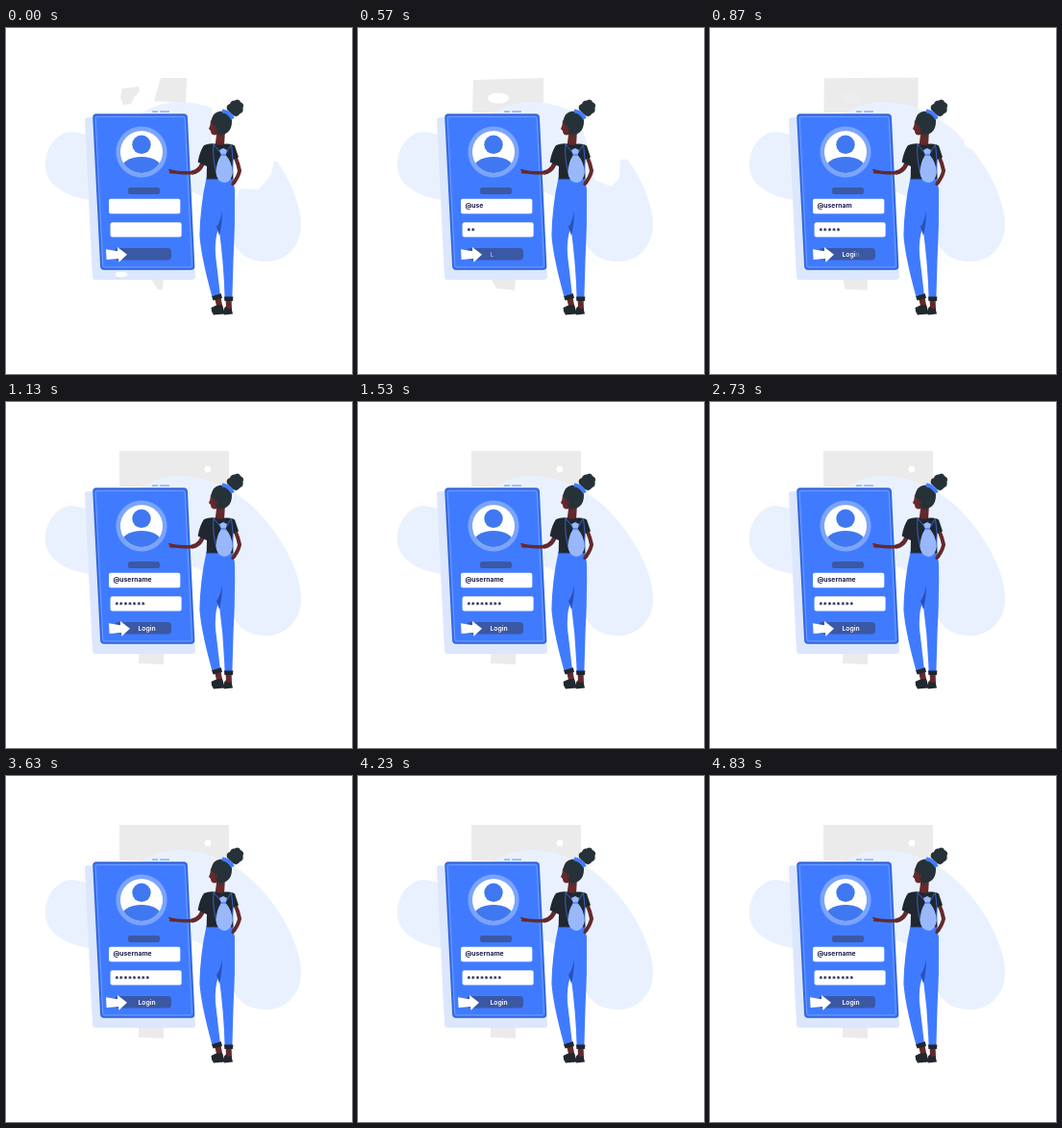
An HTML page that plays this animation: 360 by 360 pixels, repeating every 5.13 s.

```html
<!DOCTYPE html>
<html lang="en">
<head>
<meta charset="utf-8">
<title>Login</title>
<style>
  html, body { margin: 0; width: 100%; height: 100%; overflow: hidden; background: #fff; }
  svg { display: block; width: 100vw; height: 100vh; }
  text { font-family: Inter, "Open Sans", sans-serif; font-weight: 600; font-size: 6.8px; }
  .blue { fill: #407bff; }
  .dark { fill: #20272e; }
  .hair { fill: #263238; }
  .skin { fill: #64292b; }
  .limb { fill: none; stroke: #64292b; stroke-linecap: round; stroke-linejoin: round; }
  .ink { fill: #1b1a4b; font-weight: 700; }
  .bar { fill: #3a58a4; }
</style>
</head>
<body>
<svg viewBox="0 0 360 360" xmlns="http://www.w3.org/2000/svg">
  <rect width="360" height="360" fill="#fff"/>

  <g fill="#ebebeb">
    <path id="scrap" d="M121 63L138 61L139 66L134 71L130 79L122 80L119 72Z"/>
    <path id="screen"/>
    <path id="stub"/>
  </g>
  <ellipse id="hole" cx="146" cy="73" rx="11" ry="5.5" fill="#fff"/>
  <circle id="lens" cx="210" cy="70" r="3.4" fill="#fff"/>

  <path fill="#eaf1fe" d="M41 138C43 121 56 107 69 108C83 109 92 116 108 112C130 104 138 80 176 77
    C203 76 231 87 251 104C276 125 302 162 307 199C309 227 291 244 269 243
    C251 242 244 236 237 225C226 205 218 178 194 171C164 164 112 184 87 179C60 175 38 161 41 138Z"/>
  <polygon id="cover" fill="#fff"/>

  <!-- card -->
  <path fill="#dce7fe" d="M85 93H186Q189 93 189 96L197 259Q197 262 194 262H93Q90 262 90 259L82 96Q82 93 85 93Z"/>
  <ellipse id="gap" cx="120" cy="256.5" rx="6.5" ry="2.8" fill="#fff"/>
  <path d="M152 87H158M160 87H170" stroke="#5c8df5" stroke-width="1.2"/>
  <path class="blue" stroke="#2f63d2" stroke-width="1.4"
    d="M94 90H185Q188 90 188.2 93L195.6 248Q195.6 251 192.6 251H102Q99 251 98.8 248L91 93Q91 90 94 90Z"/>
  <path fill="none" stroke="#7fa7fb" stroke-width=".7"
    d="M95 92.5H184Q186 92.5 186.2 95L193.4 246.5Q193.4 248.8 191 248.8H103Q101 248.8 100.8 246.5L93.3 95Q93.3 92.5 95 92.5Z"/>

  <circle cx="141" cy="129" r="26.6" fill="#7ba4fc"/>
  <circle cx="141" cy="129" r="22" fill="#fff"/>
  <clipPath id="disc"><circle cx="141" cy="129" r="22"/></clipPath>
  <g fill="#3f78f0" clip-path="url(#disc)">
    <circle cx="141" cy="121.3" r="9.7"/>
    <ellipse cx="141" cy="148" rx="22" ry="14"/>
  </g>

  <rect class="bar" x="127" y="166" width="33" height="7" rx="2.5"/>
  <g fill="#fff">
    <rect x="107" y="177.7" width="74.3" height="15.5" rx="2"/>
    <rect x="108.6" y="202.3" width="74" height="15.1" rx="2"/>
  </g>
  <rect class="bar" x="113" y="229" width="59" height="12.4" rx="4"/>
  <text id="user" class="ink" x="111.4" y="187.2"></text>
  <text id="pass" class="ink" x="113" y="214.2" style="font-size:8.2px"></text>
  <text id="login" x="137.5" y="237.6" fill="#fff"></text>
  <path id="arrow" fill="#fff" d="M104 230.3L116 232.2V228L126 235.8L117.4 243.8L117 240L104.6 241Z"/>

  <!-- woman -->
  <path class="hair" d="M230 85Q228.5 80 233 79Q234 75 238 75.5Q242 73 244 77Q248.5 79 246.5 83Q247.5 88 243.5 89Q241 93.5 236.5 91Z"/>
  <path class="skin" d="M215 93Q212 97 212.5 101L211 105L213 107Q213 111 217 111.5L219 111L217.5 123H227L228 105Z"/>
  <path class="hair" d="M214 97Q214 88 223 86.5Q234 87 235 96Q235.5 105 230 109Q225 113 220 110Q217 105 217.5 101Q214 101 214 97Z"/>
  <path d="M225 86.3Q232.5 87.6 236 94.5" fill="none" stroke="#407bff" stroke-width="4"/>
  <circle cx="218.7" cy="104.4" r="1.3" class="skin"/>

  <path class="limb" stroke-width="4.4" d="M206 136Q203.5 148.5 194 150.4"/>
  <path class="limb" stroke-width="3.5" d="M195 150.2Q184 151.8 172.5 149.4"/>
  <path class="limb" stroke-width="1.8" d="M175 149.8L170 147.7M175 150.6L170.6 150.3"/>
  <path class="limb" stroke-width="4" d="M238.5 134Q241.5 141 243 148.5Q242 154 237 161"/>

  <path class="blue" d="M208.5 156H236L238 168Q238.6 205 236.6 240L235.4 281H227.6Q226.6 245 221.5 208Q217 218 218 236L222.8 277L214.2 279Q203 238 201.4 216Q202 185 208.5 156Z"/>
  <path fill="#2753b8" d="M225 190Q223 202 219 207L222 216Q225 204 225 190Z"/>
  <path class="dark" d="M206 122Q212 119.5 217.5 120.5Q223 123 228 120.5Q235 120 238 122.5L242 134.5L236 137L236.5 157H208.7L209 144L199.6 139.5Q201.6 128 206 122Z"/>
  <path d="M208.6 157.4H236.5" stroke="#2b5dcc" stroke-width="1"/>

  <path d="M216 121L225 132M234.5 121L228 132M216 121Q214.5 139 220 154M234.5 121Q237.5 138 235 153" fill="none" stroke="#3565c4" stroke-width="1"/>
  <path fill="#98b8fb" d="M222 127L226 125L230 127L228.5 132Q235 139 235.8 150Q235 160 227.5 161Q219 160 218.4 150Q219 139 224 132Z"/>
  <path d="M223.2 132H229" stroke="#407bff" stroke-width="1.3"/>
  <path class="limb" stroke-width="3" d="M237 160L235.8 162.5"/>

  <path class="skin" d="M217 281L223.5 280L225.5 291H219.5ZM228.6 282H234.6L235 293H229Z"/>
  <path class="dark" d="M214 279L223.8 276.3L225 281L215.5 283.5ZM227 279.5H236.4L236 284H227.4Z"/>
  <path class="dark" d="M213.5 291L219 288.5L225 288L228 297.5L216 298.5Q213.3 295 213.5 291ZM227 291.5L229 289.5L231 292.5L234.5 291.5L236 297.6L227 298.6Z"/>
</svg>
<script>
const LOOP = 5130;
const $ = id => document.getElementById(id);
const ramp = (t, a, b) => Math.min(1, Math.max(0, (t - a) / (b - a)));
const mix = (a, b, k) => a + (b - a) * k;
const blend = (a, b, k) => a.map((v, i) => mix(v, b[i], k));
const typed = (word, t, start, step) =>
  word.slice(0, Math.max(0, Math.floor((t - start) / step) + 1));

// Each shape opens up in two stages.
const cover = [
  [214,70, 310,70, 310,136, 279,139, 276,152, 263,168, 243,167, 236,190, 214,150],
  [222,70, 310,70, 310,134, 273,137, 272,156, 264,165, 246,158, 243,140, 234,106],
  Array.from({ length: 18 }, (_, i) => i % 2 ? 100 : 278)
];
const screen = [
  [161,52, 188,52, 187,78, 154,76],
  [120,54, 193,52, 193,90, 119,88],
  [118,51, 232,51, 232,90, 118,88]
];
const stub = [
  [150,260, 164,260, 163,272, 158,272],
  [138,260, 164,260, 163,273, 144,271],
  [138,260, 164,260, 164,273, 138,272]
];
const staged = (s, t) => t < 570
  ? blend(s[0], s[1], ramp(t, 300, 570))
  : blend(s[1], s[2], ramp(t, 570, 1070));

function arrowX(t) {
  if (t < 1600) return 3 * ramp(t, 130, 430);
  if (t < 2130) return 3 * (1 - ramp(t, 1600, 1830));
  return Math.floor((t - 2130) / 300) % 2 ? 0 : 3;
}

const letters = [..."Login"].map(c => {
  const s = document.createElementNS("http://www.w3.org/2000/svg", "tspan");
  s.textContent = c;
  $("login").append(s);
  return s;
});

function draw(t) {
  $("cover").setAttribute("points", staged(cover, t).join(" "));
  $("screen").setAttribute("d", "M" + staged(screen, t).join(" ") + "Z");
  $("stub").setAttribute("d", "M" + staged(stub, t).join(" ") + "Z");
  $("scrap").style.opacity = t < 570 ? 1 : 0;
  $("hole").style.opacity = ramp(t, 300, 570) * (1 - ramp(t, 600, 900));
  $("gap").style.opacity = 1 - ramp(t, 300, 500);
  $("lens").style.opacity = ramp(t, 900, 1070);
  $("user").textContent = typed("@username", t, 330, 70);
  $("pass").textContent = typed("********", t, 400, 113);
  letters.forEach((s, i) => s.setAttribute("fill-opacity", ramp(t, 520 + i * 80, 620 + i * 80)));
  $("arrow").setAttribute("transform", `translate(${arrowX(t)})`);
}

const start = performance.now();
(function tick() {
  draw((performance.now() - start) % LOOP);
  requestAnimationFrame(tick);
})();
</script>
</body>
</html>
```
